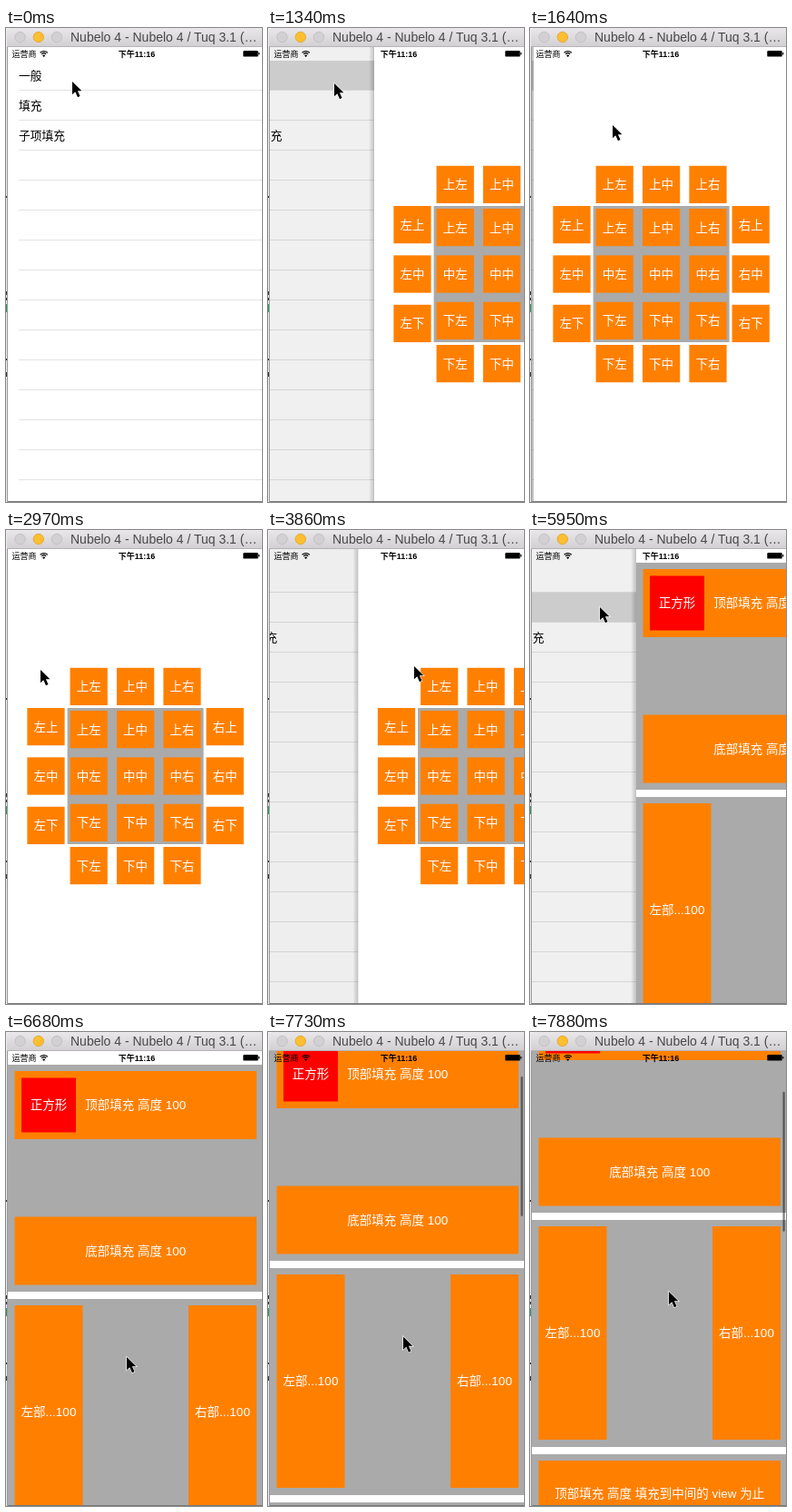
These frames come from a looping animation (282x522 px, 8 s). An HTML page:

```html
<!DOCTYPE html>
<html lang="zh-CN">
<head>
<meta charset="utf-8">
<title>Layout demo</title>
<style>
html, body { margin: 0; width: 100%; height: 100%; overflow: hidden; background: #fff; }
svg { display: block; width: 100vw; height: 100vh; }
text { font-family: "Liberation Sans", "Noto Sans CJK SC", "Noto Sans CJK", sans-serif; white-space: pre; }
</style>
</head>
<body>
<svg id="stage" viewBox="0 0 282 522">
  <defs>
    <linearGradient id="bar" x2="0" y2="1">
      <stop stop-color="#e9e7e9"/><stop offset="1" stop-color="#d1cfd1"/>
    </linearGradient>
    <linearGradient id="shade">
      <stop stop-color="#000" stop-opacity="0"/><stop offset="1" stop-color="#000" stop-opacity=".2"/>
    </linearGradient>
    <clipPath id="screen"><rect x="2" y="21" width="280" height="500"/></clipPath>
  </defs>

  <!-- sliver of the window behind -->
  <rect width="2" height="522" fill="#eee"/>
  <path d="M0 185h1v2h-1zM0 290h1v4h-1zM0 297h1v3h-1zM0 364h1v2h-1zM0 379h1v5h-1z" fill="#333"/>
  <path d="M0 304h1v9h-1z" fill="#2b9a62"/>
  <path d="M1.5 20V522" stroke="#999"/>

  <g clip-path="url(#screen)">
    <g id="list"></g>
    <rect id="dim" x="2" y="21" width="280" height="500"/>
    <g id="tiles"></g>
    <g id="fills"></g>
    <rect id="thumb" x="278.5" width="2.2" height="154" rx="1.1" fill="#000" fill-opacity=".5"/>
  </g>
  <path d="M2 521.5H282" stroke="#777"/>

  <g id="status">
    <path d="M37.6 27.2a6 6 0 0 1 8.2 0M39.2 28.9a3.6 3.6 0 0 1 5 0" fill="none" stroke="#000" stroke-width="1.2"/>
    <path d="M40.1 30.3a2.2 2.2 0 0 1 3.2 0l-1.6 1.7z"/>
    <rect x="261.3" y="25" width="16.4" height="6.6" rx="1.2"/>
    <rect x="278.2" y="27" width="1.2" height="2.6" rx=".5"/>
  </g>

  <g id="title">
    <path d="M1 21V4q0-4 4-4H282V21z" fill="url(#bar)"/>
    <path d="M1 20.5H282" stroke="#b5b3b5"/>
  </g>

  <path id="cursor" d="M0 0V14.2L3.3 11.2L6 17.2L8.5 16.1L5.9 10.3H10.4Z"
        stroke="#fff" stroke-width="1.2" paint-order="stroke"/>
</svg>

<script>
const $ = id => document.getElementById(id);
const ORANGE = '#ff8000', GRAY = '#aaa', WIDTH = 280;

function add(parent, tag, attrs) {
  const el = document.createElementNS('http://www.w3.org/2000/svg', tag);
  for (const name in attrs) el.setAttribute(name, attrs[name]);
  return parent.appendChild(el);
}
const rect = (g, x, y, width, height, fill) => add(g, 'rect', {x, y, width, height, fill});
function label(g, x, cy, size, text, extra) {
  const el = add(g, 'text', {x, y: cy + size * .37, 'font-size': size, ...extra});
  el.textContent = text;
}
const white = (g, cx, cy, text) =>
  label(g, cx, cy, 13.5, text, {fill: '#fff', 'text-anchor': 'middle'});

// title and status bars
[['#d3d0d3', '#bfbcbf'], ['#fdbe2f', '#e0a32c'], ['#d3d0d3', '#bfbcbf']].forEach(([fill, stroke], i) =>
  add($('title'), 'circle', {cx: 15.6 + i * 20.2, cy: 10, r: 5.7, fill, stroke, 'stroke-width': .8}));
label($('title'), 71, 10.2, 14, 'Nubelo 4 - Nubelo 4 / Tuq 3.1 (…', {fill: '#484848'});
label($('status'), 6.5, 28.3, 9, '运营商');
label($('status'), 144, 28.3, 9, '下午11:16', {'text-anchor': 'middle', 'font-weight': 700});

// list
rect($('list'), 2, 21, WIDTH, 500, '#fff');
const mark = rect($('list'), 2, 36, WIDTH, 33, '#d9d9d9');
for (let y = 68; y < 520; y += 33) rect($('list'), 14, y, 268, 1, '#e3e3e5');
['一般', '填充', '子项填充'].forEach((text, i) => label($('list'), 14, 52 + i * 33, 12.75, text));

function page(g) {
  rect(g, -4, 21, 6, 500, 'url(#shade)');
  rect(g, 2, 21, WIDTH, 500, '#fff');
}

// tiles inside and around a square
const tiles = $('tiles'), SIDE = 41.25, CX = 142.6, CY = 271;
function tile(cx, cy, text) {
  rect(tiles, cx - SIDE / 2, cy - SIDE / 2, SIDE, SIDE, ORANGE);
  white(tiles, cx, cy, text);
}
page(tiles);
rect(tiles, CX - 75, CY - 75, 150, 150, GRAY);
const rows = '上中下', cols = '左中右', INNER = 51.4, EDGE = 54.4, OUTER = 98.6;
for (let i = -1; i < 2; i++) {
  for (let j = -1; j < 2; j++) tile(CX + j * INNER, CY + i * INNER, rows[i + 1] + cols[j + 1]);
  for (const s of [-1, 1]) {
    tile(CX + i * INNER, CY + s * OUTER, rows[s + 1] + cols[i + 1]);
    tile(CX + s * OUTER, CY + i * EDGE, cols[s + 1] + rows[i + 1]);
  }
}

// scrolling panels
const fills = $('fills');
page(fills);
const panels = add(fills, 'g', {});
function block(x, y, w, h, text, fill = ORANGE) {
  rect(panels, x, y, w, h, fill);
  white(panels, x + w / 2, y + h / 2, text);
}
for (let i = 0; i < 3; i++) rect(panels, 2, 36 + i * 258, WIDTH, 250, GRAY);
block(9.5, 43, 266.5, 75, '顶部填充 高度 100');
block(17, 50.5, 60, 60, '正方形', '#f00');
block(9.5, 203.5, 266.5, 75, '底部填充 高度 100');
block(9.5, 301, 75, 235, '左部...100');
block(201, 301, 75, 235, '右部...100');
block(9.5, 559, 266.5, 73, '顶部填充 高度 填充到中间的 view 为止');

// keys are [tick, values...]; the picture moves once per tick
const TICK = 148.6, LOOP = 8000;
const pointer = [
  [4, 73, 59], [5, 73, 58], [6, 72, 58], [8, 72, 58], [9, 73, 61], [11, 91, 107], [13, 82, 150],
  [16, 54, 181], [20, 38, 154], [23, 38, 154], [24, 60, 153], [26, 161, 150], [27, 225, 146],
  [28, 228, 135], [30, 105, 95], [31, 83, 88], [32, 77, 85], [40, 77, 85], [41, 80, 105],
  [44, 121, 315], [45, 133, 358], [47, 145, 386], [48, 145, 385], [51, 145, 385], [53, 153, 286]
];
const tilesX = [[8, WIDTH], [9, 115], [10, 15], [11, 2], [12, 0], [23, 0], [24, 2], [25, 42],
  [26, 97.5], [27, 180], [28, 260], [29, WIDTH]];
const fillsX = [[39, WIDTH], [40, 115], [41, 15], [42, 2], [43, 0]];
const scrollY = [[51, 0], [52, 34], [53, 87]];

function at(keys, k) {
  const i = keys.findIndex(key => key[0] >= k);
  if (i < 0) return keys[keys.length - 1].slice(1);
  const b = keys[i], a = keys[Math.max(0, i - 1)];
  const f = a === b ? 0 : (k - a[0]) / (b[0] - a[0]);
  return b.slice(1).map((v, n) => a[n + 1] + (v - a[n + 1]) * f);
}
const move = (el, x, y = 0) => el.setAttribute('transform', `translate(${x} ${y})`);
function slide(el, x) {
  el.style.display = x < WIDTH ? '' : 'none';
  move(el, x);
}

function draw(now) {
  const k = Math.floor((now % LOOP + 8) / TICK);
  const [tx] = at(tilesX, k), [fx] = at(fillsX, k), [scroll] = at(scrollY, k);
  const cover = 1 - Math.min(tx, fx) / WIDTH;
  slide(tiles, tx);
  slide(fills, fx);
  move($('list'), -.3 * WIDTH * cover);
  $('dim').setAttribute('fill-opacity', .1 * cover);
  mark.style.display = k >= 40 || (k >= 9 && k < 12) ? '' : 'none';
  mark.setAttribute('y', k >= 40 ? 69 : 36);
  mark.setAttribute('width', WIDTH * 1.3);
  move(panels, 0, -scroll);
  $('thumb').style.display = scroll ? '' : 'none';
  $('thumb').setAttribute('y', 38 + .32 * scroll);
  move($('cursor'), ...at(pointer, k));
}
function loop() {
  draw(performance.now());
  requestAnimationFrame(loop);
}
loop();
</script>
</body>
</html>
```
